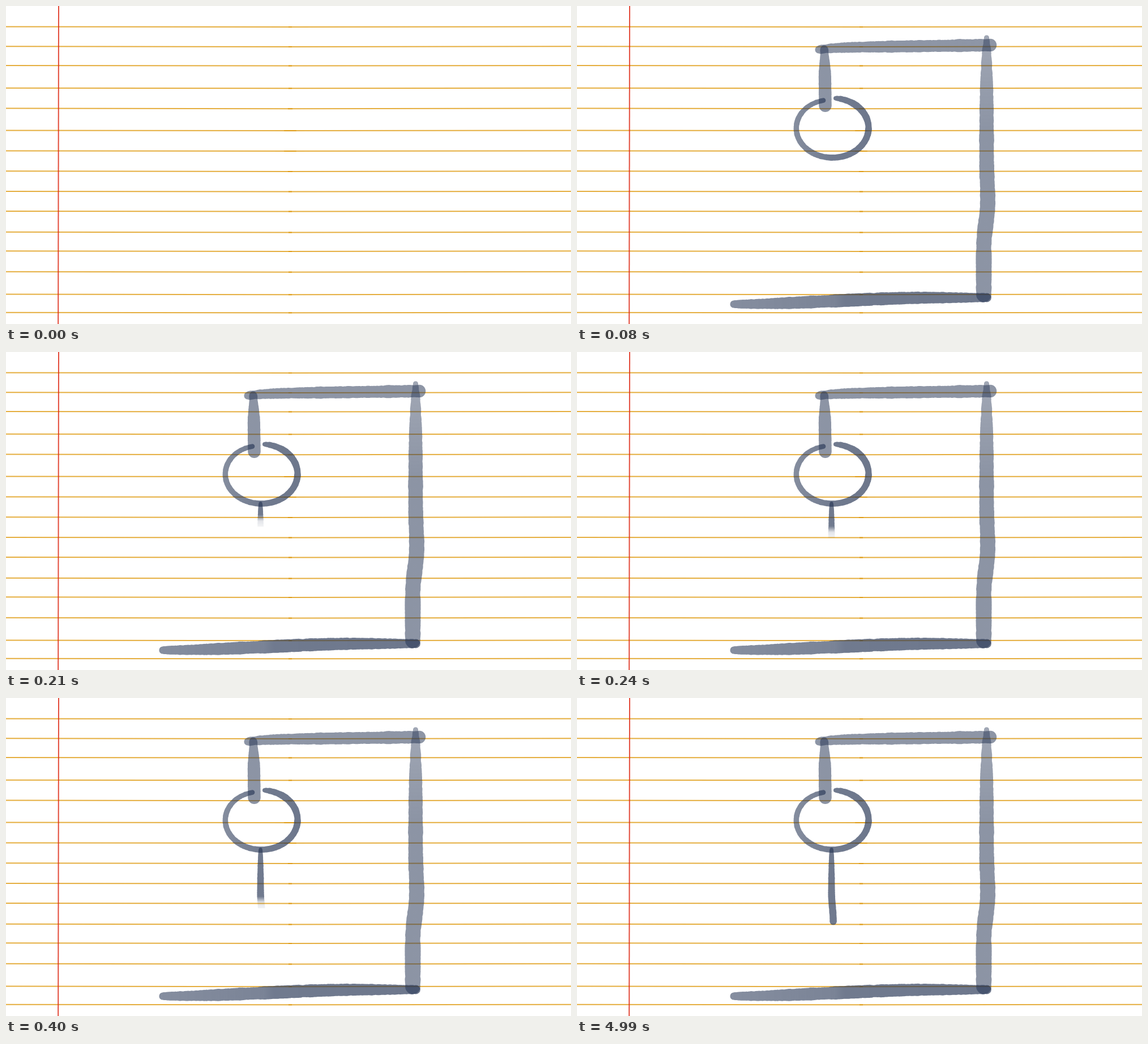
These frames come from a looping animation (998x561 px, 8000 ms). An HTML page with a canvas:

```html
<!DOCTYPE html>
<html lang="en">
<head>
<meta charset="utf-8">
<title>Hangman</title>
<style>
html, body { margin: 0; width: 100%; height: 100%; overflow: hidden; background: #fff; }
canvas { display: block; }
</style>
</head>
<body>
<canvas id="stage" width="998" height="561"></canvas>
<script>
const W = 998, H = 561, LOOP = 8000, STEP = 80, DABS = 220;
const ctx = document.getElementById('stage').getContext('2d');

// Hand-ruled, so the spacing is uneven
const rules = [36.8, 71.6, 105.2, 145, 180.9, 219.8, 255.7, 291.6, 327.2, 362.2, 399.1, 432.6, 469.1, 508.9, 541];
// Lowest solid point of the body in each drawing step
const fronts = [287, 307, 338, 350];

const mix = (a, b, u) => a + (b - a) * u;
const rise = (u, k) => 1 - Math.exp(-k * u);
const bump = (u, at, width) => Math.exp(-(((u - at) / width) ** 2));
function smooth(u, a, b) {
  const t = Math.max(0, Math.min(1, (u - a) / (b - a)));
  return t * t * (3 - 2 * t);
}

function random(seed) {
  return () => (seed = (seed * 16807) % 2147483647) / 2147483647;
}

// Union of dabs along a curve; curve(u) gives [x, y, radius] for u from 0 to 1
function brush(curve, seed, rough) {
  const path = new Path2D(), rnd = random(seed);
  let wobble = 0;
  for (let i = 0; i <= DABS; i++) {
    const [x, y, r] = curve(i / DABS);
    wobble = wobble * .6 + (rnd() - .5) * rough;
    path.moveTo(x + r + wobble, y);
    path.arc(x, y, r + wobble, 0, Math.PI * 2);
  }
  return path;
}

const base = u => [mix(277, 724, u), 526 - 11.5 * smooth(u, 0, .8), 7 + 4.3 * Math.sin(Math.PI * Math.min(u, .97)) ** .7];
const post = u => [723.5 + 2 * bump(u, .63, .09) - 5 * smooth(u, .65, .82), mix(56, 509, u), 5 + 7.5 * rise(u, 9) + 1.2 * u];
const beam = u => [mix(427, 730, u), 77 - 3.5 * rise(u, 12) - 4.5 * u, 7 + 2.5 * rise(u, 8) + 1.5 * u];
const rope = u => [436.5 + 2 * Math.sqrt(u), mix(76, 176, u), 7 + 4 * smooth(u, 0, .5)];
const body = u => [449.6 + 3 * smooth(u, .6, 1), mix(267, 394, u), 3.2 + 3.2 * rise(u, 4)];

// One turn of the pen that closes slightly inside its start
function head(u) {
  const a = mix(-1.48, 4.45, u), s = 1 - .045 * u ** 8;
  return [451 + 64 * s * Math.cos(a), 215 + 52.5 * s * Math.sin(a), 6.4 - 2 * u - 2.4 * Math.exp(-u * 30)];
}

function ink(x0, y0, x1, y1, stops) {
  const g = ctx.createLinearGradient(x0, y0, x1, y1);
  for (const [at, alpha] of stops) g.addColorStop(at, `rgba(38,53,84,${alpha})`);
  return g;
}

const strokes = [
  [brush(base, 11, .8), ink(270, 0, 732, 0, [[0, .56], [.4, .61], [.44, .66], [1, .67]])],
  [brush(post, 23, .8), ink(0, 50, 0, 522, [[0, .43], [.35, .53], [1, .53]])],
  [brush(beam, 37, .9), ink(420, 0, 742, 0, [[0, .52], [1, .52]])],
  [brush(rope, 41, .5), ink(0, 69, 0, 187, [[0, .53], [1, .53]])],
  [brush(head, 59, .4), ink(382, 0, 521, 0, [[0, .56], [.5, .66], [1, .67]])]
];
const bodyPath = brush(body, 73, .3);

function fill(path, style) {
  ctx.filter = 'blur(.7px)';
  ctx.fillStyle = style;
  ctx.fill(path);
  ctx.filter = 'none';
}

function line(x0, y0, x1, y1, color) {
  ctx.strokeStyle = color;
  ctx.lineWidth = 2;
  ctx.beginPath();
  ctx.moveTo(x0, y0);
  ctx.lineTo(x1, y1);
  ctx.stroke();
}

function drawPaper() {
  ctx.fillStyle = '#fff';
  ctx.fillRect(0, 0, W, H);
  // Each rule is two halves that overlap in the middle
  const amber = 'rgba(222,150,6,.77)';
  rules.forEach((y, i) => {
    const lap = 3 + 10 * bump(i, 5.5, 1);
    line(0, y - .3, 502 + lap, y + .3, amber);
    line(502 - lap, y + .3, W, y - .3, amber);
  });
  line(93, 0, 92.2, H, 'rgba(222,44,24,.85)');
}

function bodyInk(front) {
  const top = 260, span = 150;
  if (!front) return ink(0, top, 0, top + span, [[0, .66], [1, .66]]);
  const at = y => (y - top) / span;
  const end = at(front + 21);
  return ink(0, top, 0, top + span, [[0, .66], [at(front), .66], [at(front + 11), .13], [end, .06], [end, 0]]);
}

function draw(step) {
  drawPaper();
  if (step < 1) return;
  for (const [path, style] of strokes) fill(path, style);
  if (step > 1) fill(bodyPath, bodyInk(fronts[step - 2]));
}

let shown = -1;
const start = performance.now();
function tick(now) {
  const t = Math.max(0, now - start) % LOOP;
  const step = Math.min(6, Math.floor(t / STEP));
  if (step !== shown) draw(shown = step);
  requestAnimationFrame(tick);
}
tick(start);
</script>
</body>
</html>
```
